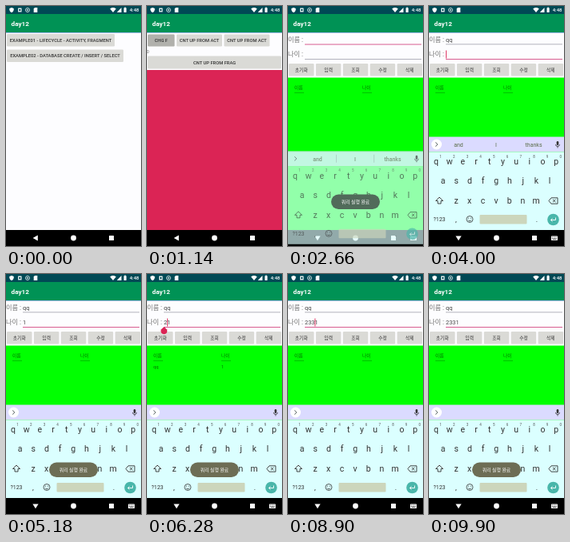
These frames come from a looping animation (169x300 px, 9.92 s). An HTML page with a canvas:

```html
<!DOCTYPE html>
<html lang="ko">
<meta charset="utf-8">
<title>day12</title>
<style>
html, body { margin: 0; width: 100%; height: 100%; overflow: hidden; background: #fff }
canvas { display: block; width: 169px; height: 300px }
</style>
<canvas id="stage"></canvas>
<script>
const LOOP = 9920, W = 169, H = 300;
const cv = document.getElementById('stage'), dpr = window.devicePixelRatio || 1;
cv.width = W * dpr;
cv.height = H * dpr;
const c = cv.getContext('2d');
const FONT = 'Roboto, "Noto Sans CJK KR", "Noto Sans CJK", sans-serif';
const ACCENT = '#db2455', INK = '#333';

const clamp = x => Math.max(0, Math.min(1, x));
const ease = x => 1 - (1 - clamp(x)) ** 3;
// last value whose start time has passed; list is [time, value] pairs
const at = (list, t) => list.reduce((v, [s, x]) => t >= s ? x : v, '');

function rect(x, y, w, h, color, r = 0) {
  c.fillStyle = color;
  c.beginPath();
  c.roundRect(x, y, w, h, r);
  c.fill();
}
function disc(x, y, r, color) {
  c.fillStyle = color;
  c.beginPath();
  c.arc(x, y, r, 0, 7);
  c.fill();
}
function path(d, x, y, color, width) {
  c.save();
  c.translate(x, y);
  const p = new Path2D(d);
  if (width) {
    c.strokeStyle = color;
    c.lineWidth = width;
    c.stroke(p);
  } else {
    c.fillStyle = color;
    c.fill(p);
  }
  c.restore();
}
function text(s, x, y, size, color = INK, align = 'left', weight = 400) {
  c.font = `${weight} ${size}px ${FONT}`;
  c.textAlign = align;
  c.textBaseline = 'alphabetic';
  c.fillStyle = color;
  c.fillText(s, x, y + size * .355);
}

// button with a touch ripple running for 280 ms (or dur) after each press
function button(label, x, y, w, h, t, presses = [], dur = 280) {
  rect(x, y, w, h, '#dadad6', 1.2);
  for (const p of presses) {
    const k = (t - p) / dur;
    if (k < 0 || k >= 1) continue;
    c.save();
    c.beginPath();
    c.roundRect(x, y, w, h, 1.2);
    c.clip();
    disc(x + w / 2, y + h / 2, w * .6 * ease(k * 2.5), `rgba(60,60,50,${.26 * Math.min(1, (1 - k) * 2)})`);
    c.restore();
  }
  text(label, x + w / 2, y + h / 2, 5.75, INK, 'center', 500);
}

function frame() {
  rect(0, 0, W, H, '#fdfdff');
  rect(0, 0, W, 10, '#004955');
  rect(0, 10, W, 23, '#009255');
  rect(0, 33, W, 1, '#a4b8f0');
  text('day12', 6.6, 21.8, 8.1, '#fff', 'left', 700);
}

function home(t) {
  frame();
  button('EXAMPLE01 - LIFECYCLE - ACTIVITY, FRAGMENT', 1, 35, 135, 15.5, t, [20], 600);
  button('EXAMPLE02 - DATABASE CREATE / INSERT / SELECT', 1, 54.5, 146, 15.5, t, [1780], 400);
}

function lifecycle(t) {
  frame();
  button('CHG F', 1, 35.5, 33.5, 15, t, [1000], 340);
  button('CNT UP FROM ACT', 37, 35.5, 57, 15, t);
  button('CNT UP FROM ACT', 96.5, 35.5, 57, 15, t);
  text('0', -.4, 56.5, 5.75, '#757575');
  rect(0, 80, W, 200, ACCENT);
  button('CNT UP FROM FRAG', 1, 62.5, 167, 16, t);
}

const ACTIONS = [
  ['초기화', [2340, 9380]],
  ['입력', [4480, 8900]],
  ['조회', [5360, 7020, 8080, 9120, 9600]],
  ['수정', [6480]],
  ['삭제', [7700]]
];
const NAME = [[3560, 'q'], [3640, 'qq']];
const AGE = [[4240, '1'], [6280, '21'], [8540, '231'], [8860, '2331']];
const CARET = [[4240, '1'], [5940, ''], [6280, '2'], [8540, '23'], [8860, '233']];
const EDITS = [2700, 3560, 3640, 3860, 4120, 5940, 6280, 8540, 8860].map(s => [s, s]);
const ROW = [[5500, '1'], [7160, '21'], [8220, ''], [9260, '2331'], [9740, '']];

function field(label, value, before, y, focused, t) {
  text(label, 0, y, 8.2, '#757575');
  text(value, 21, y, 7.4, '#484848');
  rect(21, y + 5.5, 146, focused ? 1 : .7, focused ? '#d85c90' : '#9a9aa6');
  const blink = Math.floor((t - at(EDITS, t)) / 340) % 2 === 0;
  if (focused && blink && t >= 2700) {
    c.font = `400 7.4px ${FONT}`;
    rect(21 + c.measureText(before).width, y - 5, .9, 10, ACCENT);
  }
}

function database(t) {
  frame();
  const onAge = t >= 3860, name = at(NAME, t), row = at(ROW, t);
  field('이름 :', name, name, 42, !onAge, t);
  field('나이 :', at(AGE, t), at(CARET, t), 60.5, onAge, t);
  ACTIONS.forEach(([label, presses], i) => button(label, 1 + 33.9 * i, 72, 31.5, 15.5, t, presses));
  rect(0, 89.5, W, 190.5, '#0f0');
  const dim = 'rgba(0,0,0,.55)';
  [['이름', 8, row && 'qq'], ['나이', 93, row]].forEach(([head, x, value]) => {
    text(head, x, 101.5, 5.75, dim);
    rect(x, 108, 12, .6, 'rgba(0,0,0,.4)');
    text(value, x, 115.5, 5.75, dim);
  });
  if (t >= 5900 && t < 6320) {
    path('M0-5L3.5-1.8A4 4 0 1 1-3.5-1.8Z', 21.3, 71, ACCENT);
  }
}

function keyboard(t) {
  const k = clamp((t - 2560) / 200);
  if (!k) return;
  c.save();
  c.globalAlpha = clamp(k * 1.32);
  c.translate(0, 36 * (1 - k));
  rect(0, 163.5, W, 19, '#dbdbff');
  rect(0, 182.5, W, 97.5, '#dbffff');
  if (k === 1) disc(9.5, 173, 6.5, '#fff');
  else rect(0, 164.5, W, 18, '#dbffff');
  path('M-1.3-2.5L1.3 0L-1.3 2.5', 9.5, 173, '#495555', 1);
  if (t < 3600 || t >= 3880 && t < 4240) {
    const weight = k < 1 ? 500 : 400;
    ['and', 'I', 'thanks'].forEach((s, i) => text(s, 37 + 47 * i, 173.5, 7, '#5b6d49', 'center', weight));
  }
  if (k < 1) [60, 107.5].forEach(x => rect(x, 168, .6, 10, '#92a0a0'));
  rect(159.7, 169, 2.6, 5, '#333', 1.3);
  path('M-2.5-1A2.5 2.5 0 0 0 2.5-1M0 1.5V3.5', 161, 174, '#333', .8);

  const keys = (row, x, y) => [...row].forEach((s, i) => text(s, x + 16.7 * i, y, 10.5, INK, 'center'));
  keys('qwertyuiop', 9, 194.5);
  [...'1234567890'].forEach((s, i) => text(s, 14.5 + 16.7 * i, 188, 4.5, '#555', 'center'));
  keys('asdfghjkl', 17.5, 218.5);
  keys('zxcvbnm', 34, 243);
  path('M0-4.5L4.5 0H2V3.5H-2V0H-4.5Z', 13, 243.5, INK, .9);
  path('M-5.5 0L-2.5-3.7H5.5V3.7H-2.5ZM-.5-1.7L3 1.7M3-1.7L-.5 1.7', 155.5, 243.5, INK, .9);
  text('?123', 13, 267, 7, INK, 'center');
  text(',', 34, 267, 9, INK, 'center');
  path('M4 0A4 4 0 1 1-4 0A4 4 0 1 1 4 0M-2 1A2.2 2.2 0 0 0 2 1M-1.6-1.8V-.7M1.6-1.8V-.7', 51, 266.5, INK, .8);
  rect(63.5, 261, 59, 11.5, '#ccd6bc', 1);
  text('.', 135, 267, 9, INK, 'center');
  disc(155.5, 267, 7.3, '#49b6aa');
  path('M3-2.5V.5H-3M-1-1.5L-3 .5L-1 2.5', 155.5, 267, '#fff', .9);
  if (t >= 3560 && t < 3640) {
    rect(.5, 170, 17, 36.5, '#fff', 3);
    text('q', 9, 180, 12, INK, 'center');
  }
  c.restore();
}

const TOASTS = [[2400, 3380], [4620, 5460], [5500, 6600], [6620, 7900], [7920, 8800], [9040, 10500]];
function toast(t) {
  for (const [from, to] of TOASTS) {
    const a = Math.min(clamp((t - from) / 120), clamp((to - t) / 280));
    if (!a) continue;
    c.save();
    c.globalAlpha = a;
    rect(54, 235.5, 61, 18.5, t < 3400 ? '#516b5a' : '#6d6d55', 9.2);
    text('쿼리 실행 완료', 84.5, 244.8, 5.9, '#fff', 'center');
    c.restore();
  }
}

function statusIcons() {
  path('M0-3L2.7-2V0Q2.3 2.3 0 3.2Q-2.3 2.3-2.7 0V-2Z', 7, 5, '#fff');
  rect(15, 2.5, 4.6, 5, '#dbe8e8', .6);
  rect(16.3, 4, 2, 2, '#004955');
  path('M2.5 0A2.5 2.5 0 1 1-2.5 0A2.5 2.5 0 1 1 2.5 0', 27, 5, '#c8dada', 1);
  disc(27, 5, 1.1, '#c8dada');
  path('M-1-3H2.3V3H-2.3V-1.6Z', 37, 5, '#fff');
  path('M0 3L-3.8-1.5Q0-4.3 3.8-1.5Z', 134, 5, '#fff');
  path('M2.5-3V3H-3.2Z', 142, 5, '#fff');
  rect(147.5, 2.3, 3.2, 5.7, '#fff', .4);
  rect(148.4, 1.6, 1.4, 1, '#fff');
  text('4:48', 166.5, 5.2, 6, '#fff', 'right', 500);
}

function navBar(typing) {
  rect(0, 280, W, 20, '#000');
  path(typing ? 'M-3.6-2.6H3.6L0 3.2Z' : 'M2.8-3.6V3.6L-3.4 0Z', 37, 290, '#fff');
  disc(84.5, 290, 3.4, '#fff');
  rect(129, 287, 6, 6, '#fff', .5);
  if (typing) {
    rect(153, 287.5, 8, 5.4, '#fff', .6);
    for (let i = 0; i < 6; i++) rect(154.2 + i % 3 * 2.2, 288.6 + (i > 2) * 1.4, 1, .7, '#000');
    rect(155, 291.5, 4, .6, '#000');
  }
}

// opening windows are uncovered upwards while rising; closing reverses it
function overlay(screen, t, k) {
  if (!k) return;
  c.save();
  c.fillStyle = `rgba(0,0,0,${.1 * k})`;
  c.fillRect(0, 0, W, 280);
  c.beginPath();
  c.rect(0, 280 * (1 - k), W, 280);
  c.clip();
  c.translate(0, 11 * (1 - k));
  screen(t);
  c.restore();
}

function draw(t) {
  c.setTransform(dpr, 0, 0, dpr, 0, 0);
  home(t);
  overlay(lifecycle, t, t < 1300 ? ease((t - 480) / 420) : 1 - ease((t - 1300) / 260));
  overlay(database, t, ease((t - 1980) / 360));
  statusIcons();
  navBar(t >= 2600);
  keyboard(t);
  toast(t);
}

const start = performance.now();
function tick() {
  draw((performance.now() - start) % LOOP);
  requestAnimationFrame(tick);
}
tick();
</script>
</html>
```
